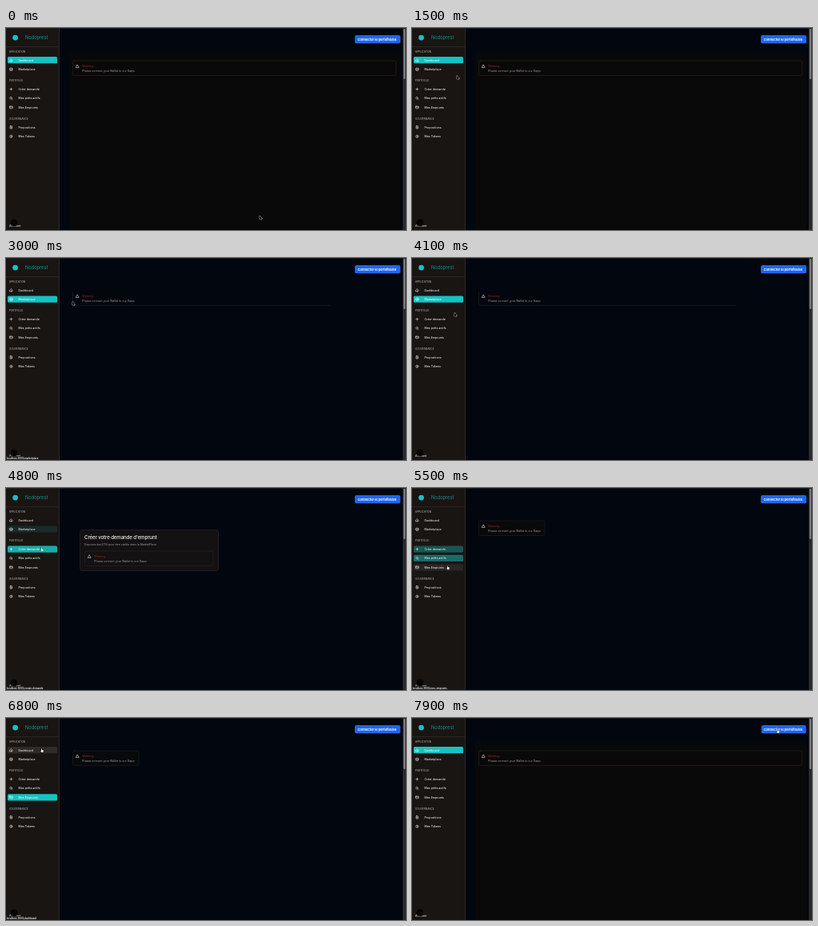
An HTML page with a canvas that plays this animation: 500x253 px, repeating every 8 s.

```html
<!DOCTYPE html>
<html lang="fr">
<head>
<meta charset="utf-8">
<title>Tableau de bord</title>
<style>
html, body { margin: 0; width: 100%; height: 100%; overflow: hidden; background: #02060e; }
canvas { display: block; width: 500px; height: 253px; }
</style>
</head>
<body>
<canvas id="stage"></canvas>
<script>
const LOOP = 8000, W = 500, H = 253;
const MOVE = 400;         // pointer travel time
const CLICK_DELAY = 150;  // from arriving on a menu item to the click
const FADE = 200;         // menu colour transition
const LINK_LINGER = 450;  // status text stays after the pointer leaves

const canvas = document.getElementById('stage');
const dpr = window.devicePixelRatio || 1;
canvas.width = W * dpr;
canvas.height = H * dpr;
const ctx = canvas.getContext('2d');
ctx.scale(dpr, dpr);
ctx.lineJoin = ctx.lineCap = 'round';

const clamp = v => Math.max(0, Math.min(1, v));
const ease = v => v * v * (3 - 2 * v);

const item = (label, icon, link) => ({ label, icon, link });
const home = item('Dashboard', 'home', 'dashboard');
const market = item('Marketplace', 'shop', 'marketplace');
const create = item('Créer demande', 'plus', 'create-demande');
const loans = item('Mes prêts actifs', 'search', 'mes-prets-actifs');
const debts = item('Mes Emprunts', 'card', 'mes-emprunts');

const groups = [
  { title: 'APPLICATION', items: [home, market] },
  { title: 'PORTFOLIO', items: [create, loans, debts] },
  { title: 'GOUVERNANCE', items: [item('Propositions', 'doc'), item('Mes Tokens', 'coin')] }
];

let row = 29.6;
for (const group of groups) {
  group.y = row;
  group.items.forEach((it, i) => it.y = row + 10.6 + i * 11.4);
  row = group.items.at(-1).y + 14.4;
}

// Pointer tour: every stop is a place or a menu item that gets clicked
const place = (at, x, y) => ({ at, x, y });
const press = (at, target) => ({ at, target, x: 43.5, y: target.y - 2, click: at + CLICK_DELAY });
const stops = [
  place(0, 317, 235.5),
  place(1300, 56, 60),
  press(1950, market),
  place(3000, 83, 55),
  place(3600, 53, 69),
  press(4500, create),
  press(5255, loans),
  press(5480, debts),
  press(6700, home),
  place(7700, 456, 14)
];
stops.forEach((stop, i) => {
  const next = stops[i + 1];
  stop.leave = next ? Math.max(stop.click || stop.at, next.at - MOVE) : LOOP;
});
const presses = stops.filter(stop => stop.target);

function text(str, x, y, size, color, weight = 400, spacing = 0) {
  ctx.font = `${weight} ${size}px Inter, sans-serif`;
  ctx.letterSpacing = spacing + 'px';
  ctx.fillStyle = color;
  ctx.fillText(str, x, y);
}

function rect(x, y, w, h, color) {
  ctx.fillStyle = color;
  ctx.fillRect(x, y, w, h);
}

function paint(fill, stroke, width = 0.6) {
  if (fill) { ctx.fillStyle = fill; ctx.fill(); }
  if (stroke) { ctx.strokeStyle = stroke; ctx.lineWidth = width; ctx.stroke(); }
}

function box(x, y, w, h, r, fill, stroke) {
  ctx.beginPath();
  ctx.roundRect(x, y, w, h, r);
  paint(fill, stroke);
}

function disc(x, y, r, fill, stroke) {
  ctx.beginPath();
  ctx.arc(x, y, r, 0, Math.PI * 2);
  paint(fill, stroke);
}

function shape(d, fill, stroke) {
  const p = new Path2D(d);
  if (stroke) { ctx.strokeStyle = stroke; ctx.lineWidth = 0.6; ctx.stroke(p); }
  if (fill) { ctx.fillStyle = fill; ctx.fill(p); }
}

function at(x, y, drawing) {
  ctx.save();
  ctx.translate(x, y);
  drawing();
  ctx.restore();
}

const icons = {
  home: c => shape('M-1.7 0L0-1.6 1.7 0 1.5 1.7H-1.5ZM0 1.6V.4', null, c),
  shop: c => shape('M-1.8-.2L-1.3-1.5H1.3L1.8-.2ZM-1.4 0V1.7H1.4V0', null, c),
  plus: c => shape('M-1.5 0H1.5M0-1.5V1.5', null, c),
  search: c => { disc(-0.3, -0.3, 1.3, null, c); shape('M.7.7L1.7 1.7', null, c); },
  card: c => { box(-1.9, -1.4, 3.8, 2.8, 0.5, null, c); shape('M-1.8-.4H1.8', null, c); },
  doc: c => { box(-1.3, -1.7, 2.6, 3.4, 0.4, null, c); shape('M-.6-.3H.6M-.6.6H.6', null, c); },
  coin: c => { disc(0, 0, 1.6, null, c); shape('M0-.7V.7', null, c); }
};

function visitAt(t) {
  const done = presses.filter(p => p.click <= t);
  const last = done.at(-1);
  return {
    page: last ? last.target : home,
    before: done.length > 1 ? done.at(-2).target : home,
    progress: last ? clamp((t - last.click) / FADE) : 1
  };
}

function highlight(it, { page, before, progress }) {
  if (it === page) return ease(progress);
  return it === before ? (1 - progress) ** 1.5 : 0;
}

function hoverLevel(it, t) {
  const levels = presses.filter(p => p.target === it)
    .map(p => clamp(Math.min(t - p.at + 100, p.leave + 150 - t) / 150));
  return Math.max(0, ...levels);
}

function menuItem(it, visit, t) {
  const on = highlight(it, visit);
  const back = (rgb, alpha) => alpha && box(2, it.y - 4.2, 62, 8.3, 1.5, `rgba(${rgb},${alpha})`);
  back('46,43,41', hoverLevel(it, t));
  back('22,194,194', on);
  const color = on > 0.6 ? '#e4f9f8' : '#e2e0de';
  at(6.4, it.y, () => icons[it.icon](color));
  text(it.label, 15.5, it.y + 1.3, 3.55, color, 500);
}

function sidebar(visit, t) {
  rect(0, 0, 67, H, '#191513');
  rect(66, 0, 1, H, '#2b2725');
  rect(0, 23, 66, 0.7, '#302b29');
  disc(11.6, 12.1, 3.4, '#20bec4');
  text('Nodoprest', 24, 14.2, 5.7, '#168f8f');
  for (const { title, y, items } of groups) {
    text(title, 4, y + 1.1, 3.05, '#a5a2a0', 500);
    items.forEach(it => menuItem(it, visit, t));
  }
  text('Account', 4, 248.5, 3.55, '#dcdad8', 500);
  disc(10, 243.8, 4.4, '#050505');
}

function alertBox(x, y, w, fill, stroke) {
  box(x + 0.5, y, w, 18.5, 2, fill, stroke);
  at(x + 6.4, y + 7, () => shape('M0-1.8L1.8 1.4H-1.8Z', null, '#e0dedc'));
  text('Warning', x + 12.3, y + 8.1, 3.55, '#82221d', 500);
  text('Please connect your Wallet to our Dapp.', x + 12.3, y + 14.1, 3.5, '#a09d9a');
}

function drawPage(page) {
  rect(67, 0, W - 67, H, '#02060e');
  if (page === home) {
    const fade = ctx.createLinearGradient(0, 26, 0, 40);
    fade.addColorStop(0, 'rgba(9,9,9,0)');
    fade.addColorStop(1, '#090909');
    rect(79, 26, 414, H - 26, fade);
    alertBox(83, 41, 404, '#0a0909', '#2e251c');
  } else if (page === market) {
    shape('M83.5 43V57.5L85 59.3H405', null, '#2a2622');
    alertBox(83, 41, 0);
  } else if (page === create) {
    box(92.5, 52.5, 173, 51, 3, '#131111', '#2f2c2b');
    text("Créer votre demande d'emprunt", 98, 64.4, 6.2, '#f0eeec', 500, -0.15);
    text('Deposez des ETH pour être visible dans la MarketPlace', 98, 71.5, 3.45, '#a09d9a');
    alertBox(98, 79, 160.5, '#131111', '#2b2725');
  } else {
    alertBox(83, 41, 82.5, '#08090b', '#232123');
  }
}

function chrome(t, pressed) {
  const inset = pressed ? 0.7 : 0;
  box(436 + inset, 9, 57 - 1.6 * inset, 10.3, 2, '#1d66f2');
  text('Connecter le portefeuille', 439.5, 15.6, 4.1, '#fff', 700, -0.04);
  rect(496, 0, 4, H, '#2a2a2a');
  box(496.8, 1, 2.4, 63, 1, '#7b7b7b');
  rect(0, 0, W, 0.6, '#2a2928');

  const shown = presses.findLast(p => t >= p.at - 100);
  if (shown && t < shown.leave + LINK_LINGER) {
    const url = 'localhost:3000/' + shown.target.link;
    ctx.font = '600 2.9px Inter, sans-serif';
    rect(0, 248.3, ctx.measureText(url).width + 1.6, 4.7, '#1e1e1f');
    text(url, 0.8, 251.8, 2.9, '#f2f2f2', 600);
  }
}

function pointerAt(t) {
  const i = stops.findLastIndex(stop => stop.at <= t);
  const from = stops[i], to = stops[i + 1] || from;
  const k = t > from.leave ? ease((t - from.leave) / (to.at - from.leave)) : 0;
  return [from.x + (to.x - from.x) * k, from.y + (to.y - from.y) * k];
}

function pointer(x, y, hand) {
  at(x, y, () => hand
    ? shape('M.6 0H1.3L1.5 1.7 3.3 2.2 3.2 3.9 2.6 4.9H.9L-.4 2.9H.6Z', '#f4f4f4', '#000')
    : shape('M0 0V4.2L1 3.3 1.8 4.9 2.5 4.5 1.8 3.1 3.1 3Z', '#080808', '#e8e8e8'));
}

function draw(t) {
  const [x, y] = pointerAt(t);
  const onButton = x > 436 && y > 9 && y < 20;
  const onItem = x < 50 && groups.some(g => g.items.some(it => Math.abs(y - it.y) < 4.2));
  const visit = visitAt(t);
  drawPage(visit.page);
  sidebar(visit, t);
  chrome(t, onButton);
  pointer(x, y, onButton || onItem);
}

const start = performance.now();
function tick() {
  draw((performance.now() - start) % LOOP);
  requestAnimationFrame(tick);
}
tick();
</script>
</body>
</html>
```
